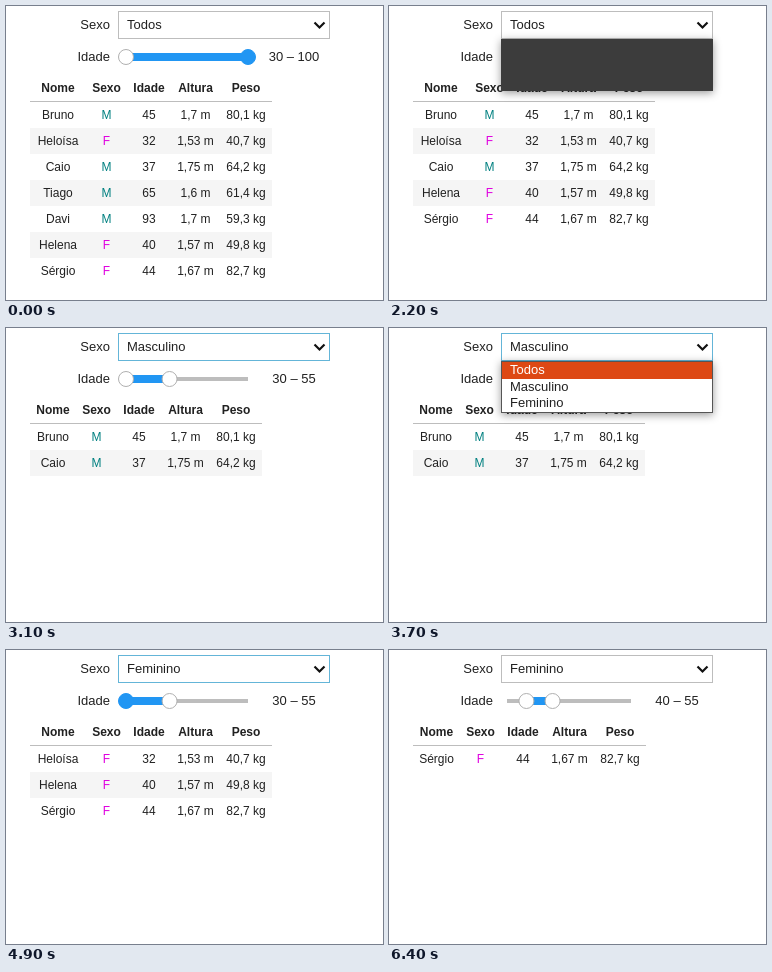
These frames come from a looping animation (377x294 px, 6500 ms). An HTML page:

```html
<!DOCTYPE html>
<html lang="pt">
<head>
<meta charset="utf-8">
<style>
html, body { margin: 0; width: 100%; height: 100%; overflow: hidden; background: #fff; }
svg { display: block; font: 13px "Liberation Sans", Arial, sans-serif; fill: #212121; }
.cell { font-size: 12px; text-anchor: middle; }
.head { font-weight: bold; }
.menu { filter: drop-shadow(0 2px 4px rgba(0, 0, 0, .4)); }
</style>
</head>
<body>
<svg id="stage" width="377" height="294" viewBox="0 0 377 294"></svg>
<script>
const LOOP = 6500;
const BLUE = '#2196f3', GRAY = '#bdbdbd';
const OPTIONS = ['Todos', 'Masculino', 'Feminino'];
const HEAD = ['Nome', 'Sexo', 'Idade', 'Altura', 'Peso'];
const COLUMNS = [52, 100.5, 143, 189.5, 240];
// name, sex, age, height, weight, width of the name column
const PEOPLE = [
  ['Bruno', 'M', 45, '1,7 m', '80,1 kg', 46],
  ['Heloísa', 'F', 32, '1,53 m', '40,7 kg', 56],
  ['Caio', 'M', 37, '1,75 m', '64,2 kg', 46],
  ['Tiago', 'M', 65, '1,6 m', '61,4 kg', 46],
  ['Davi', 'M', 93, '1,7 m', '59,3 kg', 46],
  ['Helena', 'F', 40, '1,57 m', '49,8 kg', 49],
  ['Sérgio', 'F', 44, '1,67 m', '82,7 kg', 47]
];

// Handles: 0 idle, 1 hovered, 2 dragged. Menu: index of the lit option.
const START = { lo: 30, hi: 100, left: 0, right: 1, choice: 0, filter: 0, menu: null, focus: false };
const drag = (start, key, values) => values.map((v, i) => [start + i * 100, { [key]: v }]);
const EVENTS = [
  [500, { right: 2 }],
  ...drag(500, 'hi', [98, 90, 80, 72, 65, 60, 57, 55]),
  [1700, { right: 0 }],
  [2200, { menu: 'blank' }],
  [2300, { menu: 0, focus: true }],
  [2600, { menu: 1 }],
  [2900, { menu: null }],
  [3000, { choice: 1 }],
  [3100, { filter: 1 }],
  [3500, { menu: 1 }],
  [3700, { menu: 0 }],
  [3800, { menu: 1 }],
  [3900, { menu: 2 }],
  [4300, { menu: null, choice: 2 }],
  [4400, { filter: 2 }],
  [4900, { left: 1 }],
  [5200, { left: 2, focus: false }],
  ...drag(5200, 'lo', [31, 34, 38, 40]),
  [5800, { left: 1 }],
  [6400, { left: 0 }]
];

const rect = (x, y, w, h, fill, more = '') =>
  `<rect x="${x}" y="${y}" width="${w}" height="${h}" fill="${fill}" ${more}/>`;
const text = (x, y, s, more = '') => `<text x="${x}" y="${y}" ${more}>${s}</text>`;
const sliderX = age => 120 + (age - 30) * 122 / 70;

function handle(x, mode) {
  const r = mode === 2 ? 9.1 : 7.5;
  const [fill, line] = mode ? [BLUE, BLUE] : ['#fff', '#b0b0b0'];
  return `<circle cx="${x}" cy="51" r="${r}" fill="${fill}" stroke="${line}"/>`;
}

function slider({ lo, hi, left, right }) {
  const a = sliderX(lo), b = sliderX(hi);
  return text(104, 55, 'Idade', 'text-anchor="end"') +
    rect(118, 49, 124, 4, GRAY) + rect(a, 47, b - a, 8, BLUE) +
    handle(a, left) + handle(b, right) +
    text(288, 55, `${lo} – ${hi}`, 'text-anchor="middle"');
}

function select({ choice, focus }) {
  return text(104, 23, 'Sexo', 'text-anchor="end"') +
    rect(112.5, 5.5, 211, 27, '#fff', `stroke="${focus ? '#64b5d8' : GRAY}"`) +
    text(121, 23, OPTIONS[choice]) +
    '<path d="M308.5 16.5l5 5 5-5" fill="none" stroke="#111" stroke-width="2.2"/>';
}

function table({ lo, hi, filter }) {
  const rows = PEOPLE.filter(([, sex, age]) =>
    age > lo && age <= hi && (!filter || sex === 'MF'[filter - 1]));
  const nameWidth = Math.max(46, ...rows.map(r => r[5]));
  const shift = nameWidth - 56;
  const colX = i => COLUMNS[i] + (i ? shift : shift / 2);
  let out = HEAD.map((s, i) => text(colX(i), 86, s, 'class="cell head"')).join('');
  out += rect(24, 95, 242 + shift, 1, GRAY);
  rows.forEach((row, n) => {
    const y = 96 + n * 26;
    if (n % 2) out += rect(24, y, 242 + shift, 26, '#f5f5f5');
    row.slice(0, 5).forEach((s, i) => {
      const color = i === 1 ? (s === 'M' ? '#008080' : '#e000e0') : '#212121';
      out += text(colX(i), y + 17, s, `class="cell" fill="${color}"`);
    });
  });
  return out;
}

function menu({ menu: lit }) {
  if (lit === null) return '';
  if (lit === 'blank') return `<g class="menu">${rect(112, 33, 212, 52, '#3c3c3c')}</g>`;
  const items = OPTIONS.map((s, i) => {
    const on = i === lit;
    return (on ? rect(113, [34, 51, 67][i], 210, 17, '#dd4814') : '') +
      text(121, [46, 63, 79][i], s, on ? 'fill="#fff"' : '');
  });
  return `<g class="menu">${rect(112.5, 33.5, 211, 51, '#fff', 'stroke="#555"')}${items.join('')}</g>`;
}

const stage = document.getElementById('stage');
let shown = '';
function draw(now) {
  const t = now % LOOP;
  const state = Object.assign({}, START, ...EVENTS.filter(e => e[0] <= t).map(e => e[1]));
  const picture = table(state) + slider(state) + select(state) + menu(state);
  if (picture !== shown) stage.innerHTML = shown = picture;
}

const begin = performance.now();
function tick() {
  draw(performance.now() - begin);
  requestAnimationFrame(tick);
}
tick();
</script>
</body>
</html>
```
